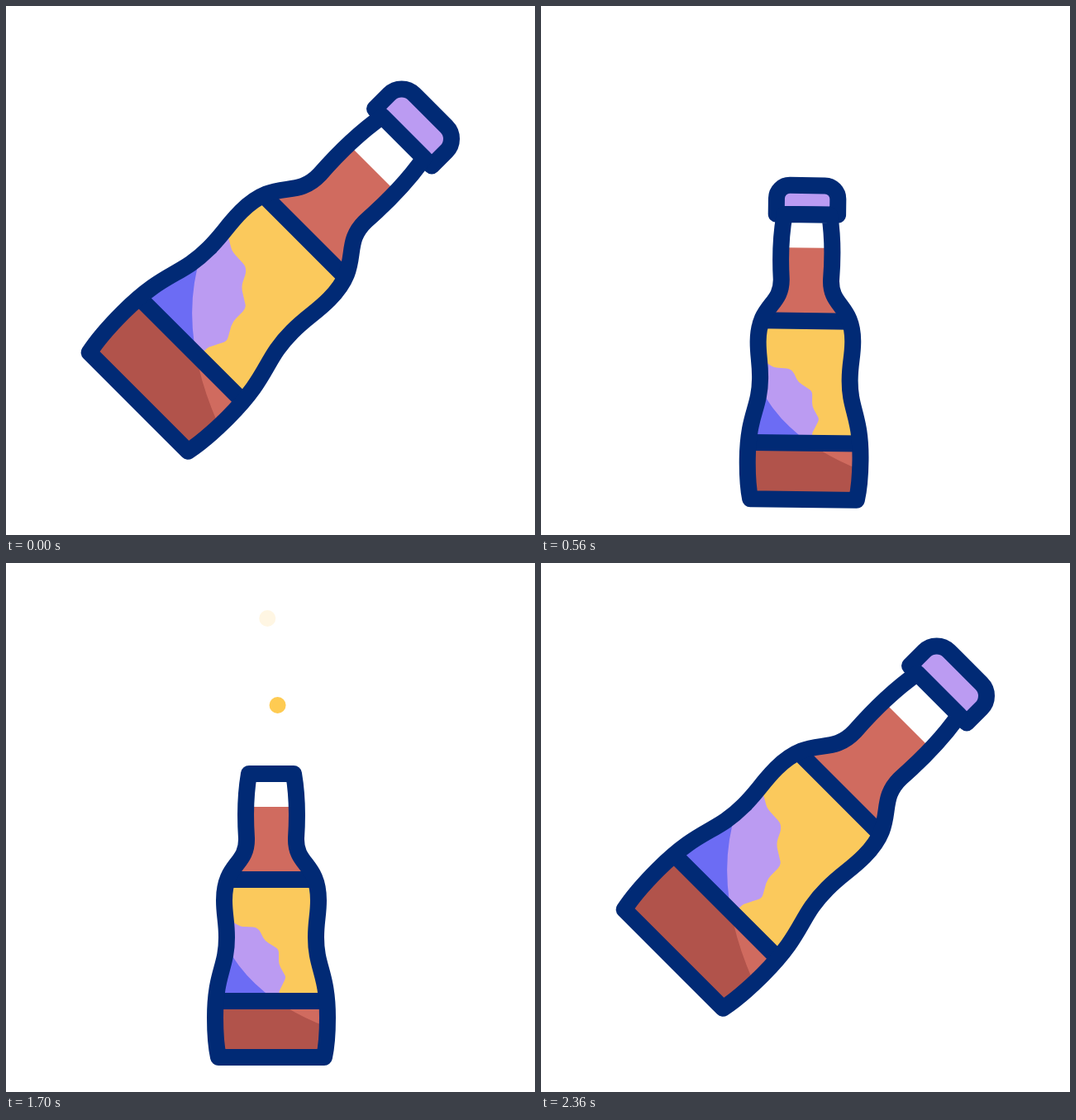
Write an HTML page that moves like this. It is 640x640 px and loops after 2.4 s.

```html
<!DOCTYPE html>
<html lang="en">
<head>
<meta charset="utf-8">
<title>Bottle</title>
<style>
  html, body { margin: 0; width: 100%; height: 100%; overflow: hidden; background: #fff; }
  svg { display: block; fill: none; }
  .line { stroke: #012a75; stroke-width: 20; stroke-linejoin: round; }
  .line * { vector-effect: non-scaling-stroke; }
  .streak { stroke: #fecb52; stroke-width: 20; stroke-linecap: round; }
  .dot { fill: #fecb52; }
</style>
</head>
<body>
<svg width="640" height="640">
  <defs>
    <path id="outline" d="M-27-343C-31-320-32-295-30-265C-29-232-57-235-57-190C-57-172-54-165-54-145C-54-108-68-102-68-48C-68-26-67-14-64 0H64C67-14 68-26 68-48C68-102 54-108 54-145C54-165 57-172 57-190C57-235 29-232 30-265C32-295 31-320 27-343Z"/>
    <clipPath id="inside"><use href="#outline"/></clipPath>
    <path id="shade" d="M-55-136Q-21-70 69-36V0H-80V-136Z"/>
    <clipPath id="label"><path d="M-80-215H80V-68H-80Z"/></clipPath>
  </defs>
  <g id="spray"></g>
  <g id="bottle">
    <g id="cap" class="line">
      <path fill="#bb9bf2" d="M-37 0V-19A16 16 0 0 1-21-35H21A16 16 0 0 1 37-19V0Z"/>
    </g>
    <g clip-path="url(#inside)">
      <path fill="#fff" d="M-80-343H80V-303H-80Z"/>
      <path fill="#d06b5f" d="M-80-303H80V0H-80Z"/>
      <use href="#shade" fill="#b1534b"/>
      <g clip-path="url(#label)">
        <path fill="#fbc95c" d="M-80-215H80V-68H-80Z"/>
        <path fill="#bb9bf2" d="M-80-164H-47C-40-160-38-158-32-158L-22-157.500Q-16-157-13-151L-10-145Q-8-141-3-138L5-133Q9-131 9-126V-117Q9-113 11-109L16-100Q18-97 16-93L10-81Q9-78 10-68H-80Z"/>
        <use href="#shade" fill="#6c6cf4"/>
      </g>
    </g>
    <g class="line">
      <path d="M-53-215H53M-66-68H66"/>
      <path d="M-27-343C-31-320-32-295-30-265C-29-232-57-235-57-190C-57-172-54-165-54-145C-54-108-68-102-68-48C-68-26-67-14-64 0H64C67-14 68-26 68-48C68-102 54-108 54-145C54-165 57-172 57-190C57-235 29-232 30-265C32-295 31-320 27-343Z"/>
    </g>
  </g>
</svg>
<script>
const LOOP = 2400;
const byId = id => document.getElementById(id);
const bottle = byId('bottle'), cap = byId('cap'), spray = byId('spray');

const clamp = x => Math.min(1, Math.max(0, x));
const ease = (t, from, to) => {
  const x = clamp((t - from) / (to - from));
  return x * x * (3 - 2 * x);
};

function add(name, attrs) {
  const node = document.createElementNS('http://www.w3.org/2000/svg', name);
  for (const key in attrs) node.setAttribute(key, attrs[key]);
  return spray.appendChild(node);
}

// head and tail: start and end times of each end of the streak
const streaks = [
  { d: 'M305 205C297 140 253 88 207 82', head: [900, 1160], tail: [1100, 1640] },
  { d: 'M334 205C341 145 372 99 430 82', head: [1130, 1450], tail: [1215, 1650] },
  { d: 'M300 212C285 195 250 188 235 217', head: [920, 1150], tail: [1100, 1660] },
  { d: 'M342 205C360 192 395 190 404 224', head: [900, 1140], tail: [1080, 1600] }
];
for (const s of streaks) s.node = add('path', { class: 'streak', d: s.d, pathLength: 1 });

const dots = [
  { start: 1025, from: [312, 222], to: [281, 57] },
  { start: 1250, from: [320, 222], to: [316, 57] },
  { start: 1494, from: [326, 222], to: [332, 106] }
];
for (const d of dots) d.node = add('circle', { class: 'dot', r: 10 });

function draw(t) {
  const tilt = 1 - ease(t, 83, 600) + ease(t, 2000, 2340);
  bottle.setAttribute('transform',
    `translate(${499 - 86.6 * tilt} ${506 + 53.3 * tilt}) rotate(${45 * tilt}) scale(${1 + 0.32 * tilt}) translate(-178 92)`);

  const off = ease(t, 620, 890) - ease(t, 1790, 2005);
  cap.setAttribute('transform', `translate(${-85 * off} ${-343 - 45 * off}) rotate(${-61 * off})`);
  cap.setAttribute('opacity', 1 - off);

  for (const { node, head, tail } of streaks) {
    const a = ease(t, ...tail), b = ease(t, ...head), length = b - a;
    node.style.display = length > 0.002 ? '' : 'none';
    node.setAttribute('stroke-dasharray', `${Math.max(0, length)} 3`);
    node.setAttribute('stroke-dashoffset', -a);
  }

  for (const { node, start, from, to } of dots) {
    const p = clamp((t - start) / 480);
    node.setAttribute('cx', from[0] + (to[0] - from[0]) * p);
    node.setAttribute('cy', from[1] + (to[1] - from[1]) * p);
    node.setAttribute('opacity', Math.min(1, p * 15, (1 - p) * 2.7));
  }
}

const begin = performance.now();
function tick() {
  draw((performance.now() - begin) % LOOP);
  requestAnimationFrame(tick);
}
tick();
</script>
</body>
</html>
```
